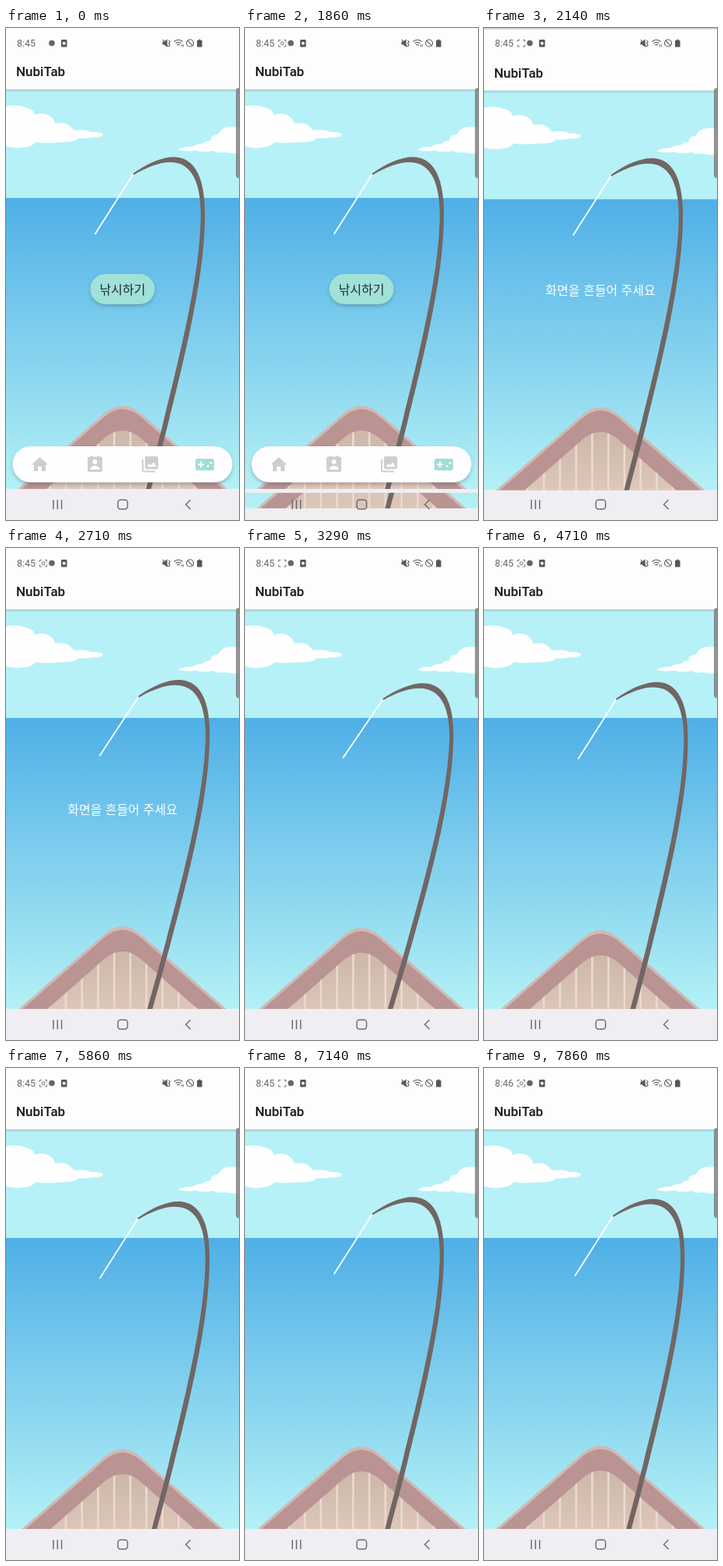
Recreate the animation shown at these times as an HTML page. Size 300 by 634 pixels, loop 8 s.

```html
<!DOCTYPE html>
<html lang="ko">
<head>
<meta charset="utf-8">
<style>
  html, body { margin: 0; width: 100%; height: 100%; overflow: hidden; background: #fff; }
  svg { display: block; width: 100vw; height: 100vh; }
  .kr { font: 16px 'Noto Sans CJK KR', 'Noto Sans CJK', sans-serif; text-anchor: middle; }
  .title { font: 500 17px Roboto, sans-serif; fill: #151515; }
  .clock { font: 12.5px Roboto, sans-serif; fill: #666; }
</style>
</head>
<body>
<svg id="stage" viewBox="0 0 300 634"></svg>
<script>
const LOOP = 8000, STEP = 1000 / 7;
const OPEN_AT = 1850, OPEN_TIME = 425, OPEN_SHIFT = 25;
const HINT_OFF = 3000, CLOCK_TICK = 7425;

// time, x, y, degrees
const rodKeys = [
  [2140, 0, 0, 0],
  [3290, 1.5, 6.8, 1.75],
  [4710, 6.5, 6.5, 0],
  [5860, 6, 5.7, 0],
  [7140, 0, 0, 0],
  [7860, 2.3, 2.6, 0]
];

const deckPath = 'M-11.5 650L128 527.5Q150 510 172 527.5L311.5 650Z';
const hullPath = 'M-49 650L126 497Q150 476 174 497L349 650Z';

const stripes = Array.from({ length: 10 }, (_, i) =>
  `<rect x="${(55 + i * 20.75).toFixed(1)}" y="510" width="2.6" height="140"/>`).join('');

const scene = (id, extra) => `
  <g id="${id}">
    <rect width="300" height="634" fill="#fefdfe"/>
    <rect y="79" width="300" height="141" fill="#b6f1f7"/>
    <rect y="79" width="300" height="4" fill="url(#toolShade)"/>
    <rect y="219" width="300" height="375" fill="url(#sea)"/>
    <text class="title" x="13" y="62">NubiTab</text>
    <g fill="#fefeff">
      <path d="M0 101Q14 98 24 102Q36 104 37 112Q48 108 56 113Q63 118 63 123Q78 121 83 127Q86 130 88 132
        Q104 130 109 134Q125 134 125 137.5Q124 141 110 141Q100 143 92 142Q92 147 72 147Q52 149 38 147Q34 154 14 154.5Q4 154 0 152Z"/>
      <path d="M222 157Q226 153 240 153Q246 149 254 149Q256 145 264 145Q262 138 273 137Q276 128 290 127
        L300 128V161Q290 163 282 160Q270 162 268 158Q255 161 245 158Q230 160 222 157Z"/>
    </g>
    <g class="boat">
      <path d="${hullPath}" fill="#d0b9b4"/>
      <path d="${hullPath}" transform="translate(0 4.5)" fill="#b99493"/>
      <path d="${deckPath}" fill="url(#deck)"/>
      <g clip-path="url(#deckClip)" fill="#eadad0">${stripes}</g>
    </g>
    <g class="rod">
      <path d="M164 188L115 265" stroke="#fff" stroke-width="1.8" stroke-linecap="round"/>
      <path fill="#716664" d="M163.5 187.5C216 151 256.5 157 256 240C256 312 238 402 186 597L176 636H168L180 595
        C232 398 250 310 250.8 240C250.5 166 214 160 164 189.5Z"/>
    </g>
    ${extra}
    <rect y="594" width="300" height="66" fill="#f0eef2"/>
  </g>`;

const tabBar = `
  <g filter="url(#soft)" opacity=".3">
    <rect x="9" y="542" width="282" height="46" rx="23" fill="#234"/>
    <rect x="109" y="319" width="82" height="39" rx="19.5" fill="#234"/>
  </g>
  <rect x="8.5" y="539" width="283" height="46.500" rx="23.200" fill="#fefdff"/>
  <g fill="#cfcdd0">
    <path d="M43.500 553L54 562.500H51V571H46V565H41V571H36V562.500H33Z"/>
    <path fill-rule="evenodd" d="M107 552.500H109V551H111V552.500H118V551H120V552.500H122Q124 552.500 124 554.500V570Q124 572 122 572H107
      Q105 572 105 570V554.500Q105 552.500 107 552.500ZM114.500 556A3 3 0 1 0 114.500 562A3 3 0 1 0 114.500 556ZM108.500 569H120.500V567.500Q118 564 114.500 564T108.500 567.500Z"/>
    <path fill-rule="evenodd" d="M181 552H194Q196 552 196 554V566.500Q196 568.500 194 568.500H181Q179 568.500 179 566.500V554Q179 552 181 552Z
      M181.500 565.500H194L190 559.500L187 563.500L185 561Z"/>
    <path d="M175 556H177V570.500H192V572.500H177Q175 572.500 175 570.500Z"/>
  </g>
  <rect x="244" y="555" width="24" height="15" rx="2.500" fill="#9fded6"/>
  <path d="M247 562.500H255M251 558.500V566.500" stroke="#fff" stroke-width="2"/>
  <circle cx="260" cy="564.500" r="1.500" fill="#fff"/><circle cx="264" cy="560.500" r="1.500" fill="#fff"/>
  <rect x="108.500" y="317" width="83" height="39" rx="19.500" fill="#a0e1d8"/>
  <text class="kr" x="150" y="342.500" fill="#25283a">낚시하기</text>`;

const hint = `<text id="hint" class="kr" x="150" y="342.500" fill="#fff">화면을 흔들어 주세요</text>`;

const systemUi = `
  <text id="clock" class="clock" x="14" y="24">8:45</text>
  <g id="rec" fill="none" stroke="#777">
    <path d="M43.500 18V15.500H46M50 15.500H52.500V18M52.500 21.500V24H50M46 24H43.500V21.500"/>
    <circle id="recDot" cx="48" cy="19.800" r="2"/>
  </g>
  <circle cx="59" cy="19.500" r="3.800" fill="#666"/>
  <rect x="71" y="15" width="7.500" height="9.500" rx="1.200" fill="#555"/>
  <circle cx="74.700" cy="19.700" r="2" fill="#fff"/>
  <g fill="none" stroke="#5c5c5c" stroke-width="1.200">
    <path d="M202 18H204L207 15.500V23.500L204 21H202Z" fill="#5c5c5c"/>
    <path d="M202 15L209 24M209.500 16L211 18L209.500 20L211 22L209.500 24"/>
    <path d="M216.500 17.500Q222 13 227.500 17.500M218.500 19.800Q222 17 225.500 19.800M220.300 22Q222 20.800 223.700 22" />
    <path d="M226.500 21V24.500M228.500 21V24.500" stroke-width=".8"/>
    <circle cx="237" cy="19.500" r="4.500"/><path d="M234 16.300L240 22.700"/>
  </g>
  <path d="M246 16H248V14.700H250.500V16H252.500V24.500H246Z" fill="#555"/>
  <path d="M296 81Q296 77 300 77V193.500Q296 193.500 296 189.500Z" fill="#77777b" opacity=".78"/>
  <g fill="none" stroke="#6e6d71" stroke-width="1.500">
    <path d="M61 608V620M66.300 608V620M71.600 608V620"/>
    <rect x="144" y="608" width="12.500" height="12" rx="3.500"/>
    <path d="M237.500 608L231.500 614L237.500 620"/>
  </g>`;

const gradient = (id, from, to, extra = '') =>
  `<linearGradient id="${id}" x2="0" y2="1" ${extra}><stop stop-color="${from}"/><stop offset="1" stop-color="${to}"/></linearGradient>`;

const stage = document.getElementById('stage');
stage.innerHTML = `
  <defs>
    ${gradient('sea', '#4fafe6', '#b4f1f6')}
    ${gradient('toolShade', '#9fcfd5', '#b6f1f7')}
    <linearGradient id="deck" gradientUnits="userSpaceOnUse" x1="0" x2="0" y1="519" y2="600">
      <stop stop-color="#cdb7a8"/><stop offset="1" stop-color="#dec8bb"/>
    </linearGradient>
    <clipPath id="deckClip"><path d="${deckPath}"/></clipPath>
    <clipPath id="reveal"><rect id="revealBox" width="300" height="700"/></clipPath>
    <filter id="soft" x="-10%" y="-10%" width="120%" height="120%"><feGaussianBlur stdDeviation="2.500"/></filter>
  </defs>
  ${scene('home', tabBar)}
  <rect id="dim" width="300" height="634"/>
  <g clip-path="url(#reveal)">${scene('fishing', hint)}</g>
  ${systemUi}`;

const el = id => document.getElementById(id);
const boat = stage.querySelector('#fishing .boat');
const rod = stage.querySelector('#fishing .rod');
const parts = Object.fromEntries(
  ['home', 'dim', 'fishing', 'hint', 'clock', 'rec', 'recDot', 'revealBox'].map(id => [id, el(id)]));

const clamp = v => Math.min(1, Math.max(0, v));
const wave = v => (1 - Math.cos(Math.PI * v)) / 2;
const show = (node, on) => node.setAttribute('visibility', on ? 'visible' : 'hidden');

// Cubic bezier easing (.4, 0, .2, 1)
function fastOutSlowIn(x) {
  let lo = 0, hi = 1;
  for (let i = 0; i < 20; i++) {
    const s = (lo + hi) / 2;
    const bx = 1.2 * s * (1 - s) ** 2 + 0.6 * s * s * (1 - s) + s ** 3;
    if (bx < x) lo = s; else hi = s;
  }
  return lo * lo * (3 - 2 * lo);
}

function rodPose(t) {
  if (t <= rodKeys[0][0]) return [0, 0, 0];
  const next = rodKeys.findIndex(k => k[0] > t);
  if (next < 0) return rodKeys[rodKeys.length - 1].slice(1);
  const a = rodKeys[next - 1], b = rodKeys[next];
  const k = wave((t - a[0]) / (b[0] - a[0]));
  return [1, 2, 3].map(i => a[i] + (b[i] - a[i]) * k);
}

function render(t) {
  const p = clamp((t - OPEN_AT) / OPEN_TIME);
  const eased = fastOutSlowIn(p);
  const opening = p > 0 && p < 1;

  show(parts.home, p < 1);
  show(parts.fishing, p > 0);
  show(parts.dim, opening);
  parts.dim.setAttribute('opacity', 0.22 * eased);
  parts.fishing.setAttribute('transform', `translate(0 ${p < 1 ? OPEN_SHIFT * (1 - eased) : 0})`);
  parts.revealBox.setAttribute('y', 634 * clamp(1 - p / 0.6) ** 2);

  const bob = t < 1900 ? 0 : 6 * wave((t - 1900) / 3000);
  boat.setAttribute('transform', `translate(0 ${bob})`);
  const [x, y, angle] = rodPose(t);
  rod.setAttribute('transform', `translate(${x} ${y}) rotate(${angle} 183 594)`);

  show(parts.hint, p > 0 && t < HINT_OFF - 5);
  show(parts.rec, t >= 140);
  show(parts.recDot, t >= 140 && t % 1000 >= 500);
  parts.clock.textContent = t < CLOCK_TICK ? '8:45' : '8:46';
}

function tick(now) {
  const t = now % LOOP;
  render(Math.floor((t + 4) / STEP) * STEP);
  requestAnimationFrame(tick);
}
render(0);
requestAnimationFrame(tick);
</script>
</body>
</html>
```
